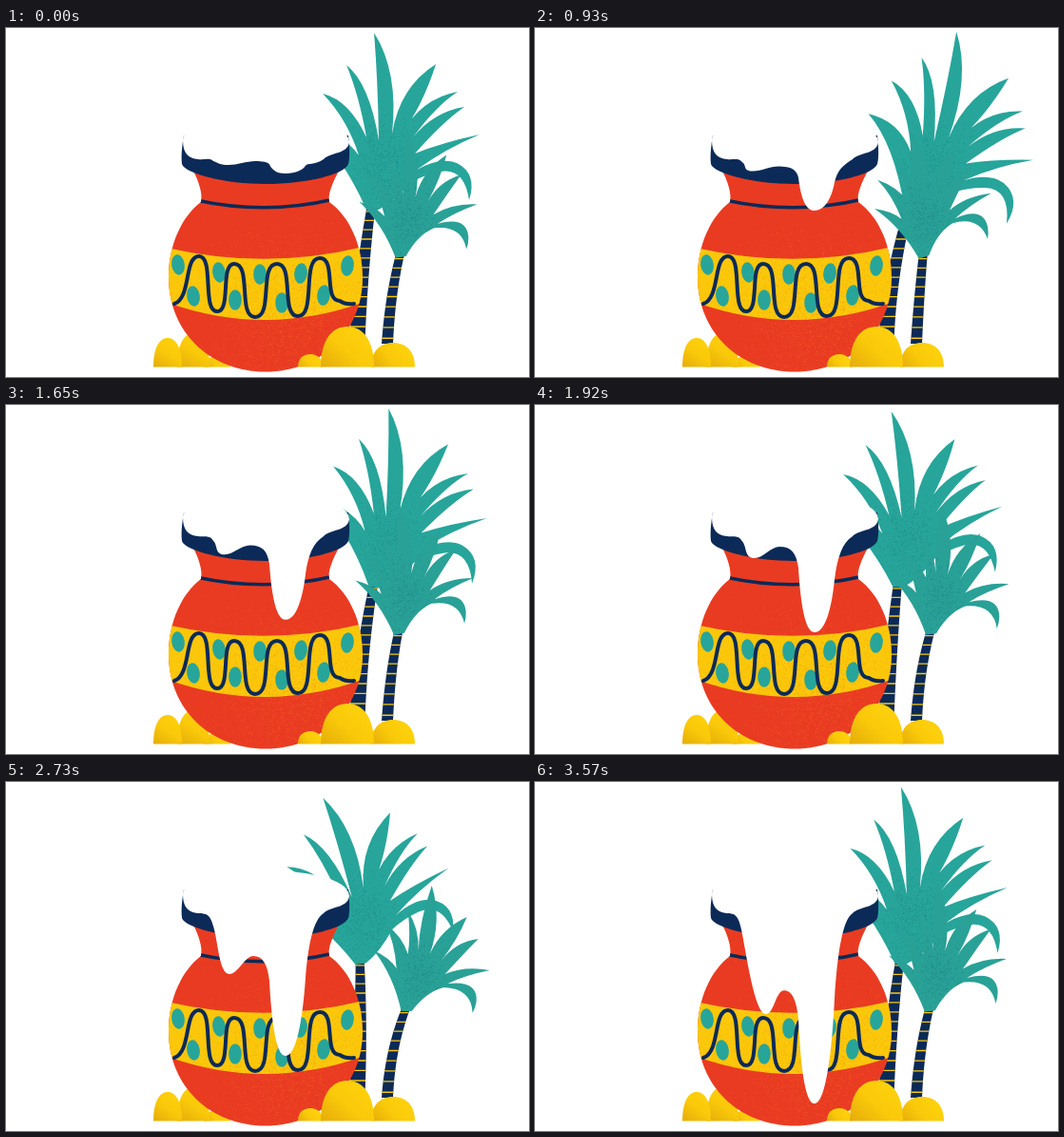
An HTML page with a canvas that plays this animation: 550 px wide and 367 px high, repeating every 3.6 s.

```html
<!DOCTYPE html>
<html lang="en">
<head>
<meta charset="utf-8">
<title>Pot and palms</title>
<style>
html, body { margin: 0; width: 100%; height: 100%; overflow: hidden; background: #fff; }
canvas { display: block; }
</style>
</head>
<body>
<canvas id="stage" width="550" height="367"></canvas>
<script>
const ctx = document.getElementById('stage').getContext('2d');
const LOOP = 3600;
const RED = '#e93b22', NAVY = '#0b2a57', YELLOW = '#fbc70b', TEAL = '#27a59a';
const mix = (a, b, k) => a + (b - a) * k;

function random(seed) {
  return () => (seed = (seed * 16807) % 2147483647) / 2147483647;
}

// Soft cloud of one-pixel grains around a centre.
function grains(seed, count, x, y, rx, ry) {
  const next = random(seed), spread = () => next() + next() + next() - 1.5;
  return Array.from({ length: count }, () => [x + spread() * rx, y + spread() * ry]);
}

function speckle(dots, color) {
  ctx.fillStyle = color;
  for (const [x, y] of dots) ctx.fillRect(x, y, 1, 1);
}

const potGlow = grains(11, 2300, 300, 300, 75, 85);
const potShade = grains(23, 900, 215, 300, 55, 70);
const bigGrain = grains(37, 900, 16, -45, 34, 50);
const smallGrain = grains(51, 700, 14, -36, 26, 38);

// Lean of the large palm in degrees over one loop.
const SWAY = [[0, 0], [510, 9.6], [1000, 14.2], [1350, 11.4], [1920, -3],
              [2600, -14], [2730, -13.6], [3090, -8.6]];

function spline(keys, t) {
  const n = keys.length;
  const at = i => {
    const [kt, v] = keys[(i + n) % n];
    return [kt + Math.floor(i / n) * LOOP, v];
  };
  let i = n - 1;
  while (keys[i][0] > t) i--;
  const slope = j => (at(j + 1)[1] - at(j - 1)[1]) / (at(j + 1)[0] - at(j - 1)[0]);
  const [t0, v0] = at(i), [t1, v1] = at(i + 1), d = t1 - t0, u = (t - t0) / d;
  const u2 = u * u, u3 = u2 * u;
  return v0 * (2 * u3 - 3 * u2 + 1) + v1 * (3 * u2 - 2 * u3) +
    slope(i) * d * (u3 - 2 * u2 + u) + slope(i + 1) * d * (u3 - u2);
}

// time, long drip y, short drip x and y, gap x and y
const POUR = [
  [0, 153, 234, 144, 262, 140],
  [510, 173, 229, 148, 256, 145],
  [1350, 211, 229, 153, 256, 146],
  [1920, 239, 231, 161, 257, 149],
  [2730, 288, 235, 202, 260, 183],
  [3090, 309, 238, 220, 261, 198],
  [3600, 340, 243, 245.5, 262, 220.5]
];

function pourAt(t) {
  const i = POUR.findIndex(row => row[0] > t), a = POUR[i - 1], b = POUR[i];
  const k = (t - a[0]) / (b[0] - a[0]);
  return a.slice(1).map((v, j) => mix(v, b[j + 1], k));
}

// Crown outlines: start point, then curves of control x, y and end x, y.
const BIG_CROWN = {
  pivot: [384, 190], start: [379, 191],
  curves: [
    [352, 130, 318, 107], [351, 106, 371, 134],
    [359, 96, 333, 69], [361, 76, 379, 115],
    [371, 70, 358, 39], [382, 58, 392, 118],
    [391, 55, 387, 5], [413, 46, 406, 111],
    [414, 62, 452, 38], [438, 82, 415, 113],
    [436, 74, 475, 67], [452, 82, 428, 115],
    [450, 88, 482, 83], [460, 98, 430, 132],
    [457, 121, 498, 112], [462, 127, 432, 149],
    [457, 135, 474, 142], [496, 153, 487, 181],
    [482, 146, 456, 151], [438, 155, 425, 163],
    [407, 184, 390, 192]
  ]
};
const SMALL_CROWN = {
  pivot: [420, 240], start: [415, 241],
  curves: [
    [407, 204, 386, 177], [403, 185, 410, 196],
    [408, 168, 398, 149], [416, 162, 422, 181],
    [425, 162, 422, 136], [434, 154, 433, 177],
    [434, 146, 447, 109], [458, 145, 445, 181],
    [457, 154, 484, 142], [474, 166, 457, 188],
    [472, 168, 496, 165], [484, 177, 461, 202],
    [482, 193, 508, 198], [483, 203, 464, 212],
    [496, 208, 494, 231], [493, 238, 490, 243],
    [489, 217, 460, 216], [442, 220, 426, 241]
  ]
};

function crown(shape, x, y, degrees, stretch, grain, color) {
  const [px, py] = shape.pivot;
  ctx.save();
  ctx.translate(x, y);
  ctx.rotate(degrees * Math.PI / 180);
  ctx.scale(1, stretch);
  ctx.beginPath();
  ctx.moveTo(shape.start[0] - px, shape.start[1] - py);
  for (const [cx, cy, ex, ey] of shape.curves)
    ctx.quadraticCurveTo(cx - px, cy - py, ex - px, ey - py);
  ctx.closePath();
  ctx.fillStyle = color;
  ctx.fill();
  ctx.clip();
  speckle(grain, 'rgba(22,112,118,.28)');
  ctx.restore();
}

function trunk(base, bend, top, wide, narrow, rings) {
  const curve = (a, b, c, u) => mix(mix(a, b, u), mix(b, c, u), u);
  const edge = (u, side) => [
    curve(base[0], bend[0], top[0], u) + side * mix(wide, narrow, u) / 2,
    curve(base[1], bend[1], top[1], u)
  ];
  ctx.beginPath();
  for (let i = 0; i <= 20; i++) ctx.lineTo(...edge(i / 20, -1));
  for (let i = 20; i >= 0; i--) ctx.lineTo(...edge(i / 20, 1));
  ctx.fillStyle = NAVY;
  ctx.fill();
  ctx.strokeStyle = YELLOW;
  ctx.lineWidth = 1.3;
  ctx.beginPath();
  for (let i = 0; i < rings; i++) {
    const u = (i + .5) / rings;
    ctx.moveTo(...edge(u, -1));
    ctx.lineTo(...edge(u, 1));
  }
  ctx.stroke();
}

function palms(t) {
  const lean = spline(SWAY, t);
  const bigTop = 384 + lean * (lean > 0 ? .7 : .87);
  trunk([369, 330], [374, 255], [bigTop, 188], 17, 9, 14);
  crown(BIG_CROWN, bigTop, 190, lean, 1 + lean * .003, bigGrain, TEAL);
  const smallTop = 414.5 - lean * .45;
  trunk([401, 332], [404, 280], [smallTop, 238], 12, 9, 9);
  crown(SMALL_CROWN, smallTop, 240, -lean * .63 - 8.5, 1, smallGrain, '#29a197');
}

function rock(x, top, half) {
  const base = 356.5, shade = ctx.createLinearGradient(x - half, base, x + half * .3, top);
  shade.addColorStop(0, '#e5ac0a');
  shade.addColorStop(.55, '#fac90a');
  shade.addColorStop(1, '#fdd00c');
  ctx.fillStyle = shade;
  ctx.beginPath();
  ctx.moveTo(x - half, base);
  ctx.bezierCurveTo(x - half, mix(base, top, .65), x - half * .6, top, x, top);
  ctx.bezierCurveTo(x + half * .6, top, x + half, mix(base, top, .65), x + half, base);
  ctx.fill();
}

const POT = new Path2D(`M196 148C203 162 207 174 205 183C185 198 171 228 171 262
  C171 320 215 361.5 273 361.5C331 361.5 375 320 375 262C375 228 361 198 340 183
  C338 174 344 162 351 148Z`);
const RIM = new Path2D(`M187 113C185 124 184 135 185 143C188 153 230 164 273 164
  C316 164 356 154 360 143C362 135 361 124 360 113Z`);
const BAND = new Path2D('M165 230Q273 256 380 229V287Q273 327 165 287Z');
const WAVE = [[203, 240], [222, 298], [240, 248], [262, 304], [285, 248], [307, 303], [330, 242], [351, 287]];
const OVALS = [[181, 249], [224, 257], [267, 259], [310, 258], [359, 250],
               [197, 282], [241, 286], [290, 289], [334, 281]];

function pot() {
  ctx.save();
  ctx.clip(POT);
  ctx.fillStyle = RED;
  ctx.fillRect(160, 140, 230, 225);
  ctx.strokeStyle = NAVY;
  ctx.lineWidth = 3.6;
  ctx.beginPath();
  ctx.moveTo(200, 181);
  ctx.quadraticCurveTo(273, 197, 345, 180);
  ctx.stroke();
  speckle(potGlow, 'rgba(255,125,45,.28)');
  ctx.fillStyle = YELLOW;
  ctx.fill(BAND);
  ctx.save();
  ctx.clip(BAND);
  speckle(potGlow, 'rgba(235,150,15,.4)');
  speckle(potShade, 'rgba(235,160,15,.25)');
  ctx.restore();
  ctx.fillStyle = TEAL;
  for (const [x, y] of OVALS) {
    ctx.beginPath();
    ctx.ellipse(x, y, 6.8, 10.8, x < 230 ? -.15 : x > 300 ? .12 : 0, 0, 7);
    ctx.fill();
  }
  ctx.lineWidth = 4;
  ctx.lineCap = 'round';
  ctx.beginPath();
  ctx.moveTo(177, 290);
  ctx.bezierCurveTo(195, 284, 187, 240, ...WAVE[0]);
  for (let i = 1; i < WAVE.length; i++) {
    const [x0, y0] = WAVE[i - 1], [x1, y1] = WAVE[i], d = (x1 - x0) * .85;
    ctx.bezierCurveTo(x0 + d, y0, x1 - d, y1, x1, y1);
  }
  ctx.quadraticCurveTo(357, 291, 366, 290);
  ctx.stroke();
  ctx.restore();
  ctx.fillStyle = NAVY;
  ctx.fill(RIM);
}

function milk(t) {
  const [tip, lx, ly, gx, gy] = pourAt(t);
  const h = tip - 138, d = tip - gy;
  ctx.fillStyle = '#fff';
  ctx.beginPath();
  ctx.moveTo(186, 118);
  ctx.bezierCurveTo(186, 100, 235, 93, 273, 93);
  ctx.bezierCurveTo(312, 93, 361, 101, 361, 120);
  ctx.bezierCurveTo(359, 133, 342, 130, 334, 138);
  ctx.bezierCurveTo(323, 145, 318, 138 + h * .22, 315, 138 + h * .45);
  ctx.bezierCurveTo(312, 138 + h * .75, 305, tip, 294, tip);
  ctx.bezierCurveTo(283, tip, 279, gy + d * .6, 277, gy + d * .25);
  ctx.bezierCurveTo(275, gy + d * .08, 270, gy, gx, gy);
  ctx.bezierCurveTo(gx - 9, gy, lx + 9, ly, lx, ly);
  ctx.bezierCurveTo(lx - 11, ly, 223, mix(139, ly, .45), 218, mix(139, ly, .2));
  ctx.bezierCurveTo(214, 136, 208, 139, 202, 138);
  ctx.bezierCurveTo(192, 137, 186, 132, 186, 118);
  ctx.fill();
}

function droplet(t, start, x, y, length) {
  const age = (t - start) / 1000;
  if (age < 0 || age > .42) return;
  const cy = y + 1130 * age * age;
  ctx.save();
  ctx.clip(POT);
  ctx.fillStyle = '#fff';
  ctx.beginPath();
  ctx.moveTo(x, cy - length * .55);
  ctx.bezierCurveTo(x + 2, cy - 3, x + 4.5, cy, x + 4.2, cy + 3);
  ctx.bezierCurveTo(x + 4, cy + length * .5, x - 4, cy + length * .5, x - 4.2, cy + 3);
  ctx.bezierCurveTo(x - 4.5, cy, x - 2, cy - 3, x, cy - length * .55);
  ctx.fill();
  ctx.restore();
}

function draw(now) {
  const t = now % LOOP;
  ctx.fillStyle = '#fff';
  ctx.fillRect(0, 0, 550, 367);
  palms(t);
  rock(222, 345, 14);
  rock(197, 321, 17);
  rock(170, 326, 15);
  pot();
  milk(t);
  droplet(t, 480, 293, 174, 14);
  droplet(t, 1230, 227, 156, 15);
  rock(407, 331, 23);
  rock(320, 343, 13);
  rock(359, 314, 28);
  requestAnimationFrame(loop);
}

const begin = performance.now();
function loop() { draw(performance.now() - begin); }
loop();
</script>
</body>
</html>
```
